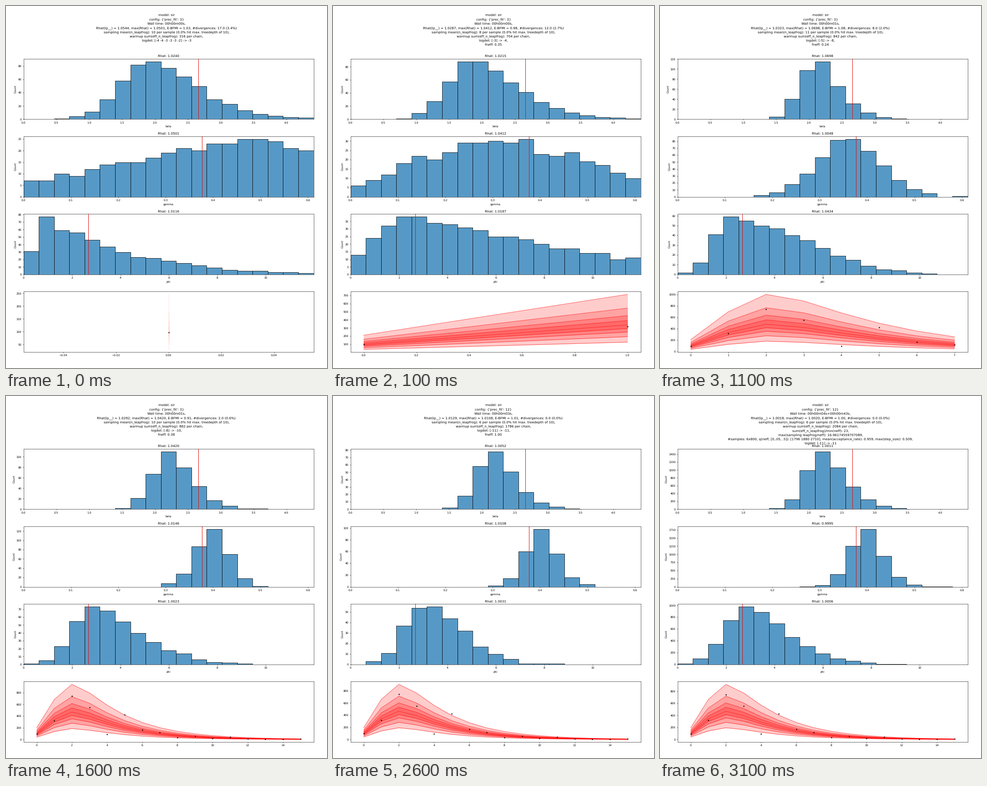
These frames come from a looping animation (706 px wide and 794 px high, 3.6 s). A matplotlib script:

```python
import numpy as np
import matplotlib.pyplot as plt
from matplotlib.animation import FuncAnimation

W, H, DPI = 706, 794, 64
S = 0.681            # default point sizes shrink by this factor
PX = 72 / DPI        # points per pixel
LEFT, WIDTH, HEIGHT = 38.5, 638, 132.7
TOP, PITCH = 115.5, 170.3
BINS = 19
POPULATION, SEED_CASES = 840, 100

plt.rcParams.update({
    'font.family': 'DejaVu Sans', 'font.size': 10 * S,
    'text.hinting': 'no_hinting',
    'axes.titlesize': 12 * S, 'axes.titlepad': 6 * S, 'axes.labelpad': 4 * S,
    'axes.linewidth': 0.6 * PX,
    'xtick.major.size': 3.5 * S, 'ytick.major.size': 3.5 * S,
    'xtick.major.pad': 3.5 * S + 0.5 * PX, 'ytick.major.pad': 3.5 * S,
    'xtick.major.width': 0.6 * PX, 'ytick.major.width': 0.6 * PX,
    'lines.markersize': 6 * S, 'lines.markeredgewidth': S,
})

# name, x limit, true value
PARAMS = [('beta', 4.412, 2.659), ('gamma', 0.612, 0.3765),
          ('phi', 11.97, 2.68)]
OBSERVED = [97, 319, 745, 551, 91, 427, 169, 117, 34, 56, 18, 39, 11, 3, 5, 9]
# log offsets of the quantile curves, in units of the upper spread
LEVELS = np.array([1, 0.64, 0.39, 0.2, 0, -0.18, -0.4, -0.74, -1.31])

fig = plt.figure(figsize=(W / DPI, H / DPI), dpi=DPI, facecolor='white')
states = []


def panel(row):
    bottom = H - TOP - PITCH * row - HEIGHT
    return fig.add_axes([LEFT / W, bottom / H, WIDTH / W, HEIGHT / H])


def header(lines):
    return [fig.text(0.5, 1 - (22.3 + 9.28 * i) / H, line, ha='center',
                     va='baseline', fontsize=12 * S)
            for i, line in enumerate(lines)]


def bump(rng, peak, mode, left, right, tail=1.6):
    """Counts of a skewed bell over the bins, with a little sampling noise."""
    d = np.arange(BINS) - mode
    shape = np.where(d < 0, (np.abs(d) / left) ** 2,
                     (np.abs(d) / right) ** tail)
    counts = peak * np.exp(-shape / 2)
    counts += 0.35 * np.sqrt(counts) * rng.normal(size=BINS)
    return np.round(counts.clip(0) * peak / counts.max())


def histogram(row, rhat, counts):
    name, limit, truth = PARAMS[row]
    ax = panel(row)
    step = limit / BINS
    used = np.flatnonzero(counts)
    ax.bar(used * step, counts[used], width=step, align='edge',
           facecolor='#1f77b4bf', edgecolor='black', linewidth=0.8 * PX)
    ax.axvline(truth, color='#e00c0c', linewidth=PX)
    ax.set(xlim=(0, limit), ylim=(0, 1.05 * counts.max()), title=f'Rhat: {rhat}')
    ax.set_xlabel(name, labelpad=4 * S + 0.5 * PX)
    ax.set_ylabel('Count')
    return ax


def infected(beta, gamma, days, sub=100):
    """Daily infected counts of the SIR model (Euler steps)."""
    i = SEED_CASES / POPULATION
    s, curve = 1 - i, []
    for step in range(days * sub):
        if step % sub == 0:
            curve.append(i * POPULATION)
        new = beta * s * i / sub
        s, i = s - new, i + new - gamma * i / sub
    return np.array(curve)


def fan(beta, gamma, spread, days):
    ax = panel(3)
    t = np.arange(days)
    curves = infected(beta, gamma, days) * np.exp(spread * LEVELS)[:, None]
    for i in range(4):
        ax.fill_between(t, curves[-1 - i], curves[i], color='red', alpha=0.2,
                        linewidth=S)
    for curve in curves:
        ax.plot(t, curve, color='red', alpha=0.6, linewidth=0.95 * PX)
    ax.plot(t, OBSERVED[:days], 'k.')
    return ax


def add_state(prec, wall, diag, leaps, warmup, tail, rhats, bumps, sir):
    rng = np.random.default_rng(len(states))
    lp, worst, bfmi, div = diag
    lines = ['model: sir', f"config: {{'prec_fit': {prec}}}",
             f'Wall time: {wall},',
             f'Rhat(lp__) = {lp}, max(Rhat) = {worst}, E-BFMI = {bfmi}, '
             f'#divergences: {div}',
             f'sampling mean(n_leapfrog): {leaps} per sample '
             '(0.0% hit max. treedepth of 10),',
             f'warmup sum(eff_n_leapfrog): {warmup} per chain,']
    group = header(lines + tail)
    for row in range(3):
        group.append(histogram(row, rhats[row], bump(rng, *bumps[row])))
    group.append(fan(*sir))
    states.append(group)


# bumps: peak count, mode and side widths in bins, tail exponent
# sir: beta, gamma, spread, days
add_state(3, '00h00m00s', ('1.0544', '1.0501', '1.03', '17.0 (3.4%)'), 10, 316,
          ['logdet: [-4 -4 -3 -3 -3 -2] -> -3'],
          ['1.0240', '1.0501', '1.0116'],
          [(87, 8, 2, 2.7), (25, 15, 9, 6), (77, 1, 0.75, 2.9, 1.1)],
          (2.2, 0.35, 0.9, 1))

add_state(3, '00h00m00s', ('1.0287', '1.0412', '0.98', '12.0 (2.7%)'), 8, 704,
          ['logdet: [-3] -> -4,', 'fneff: 0.35'],
          ['1.0215', '1.0412', '1.0187'],
          [(88, 7.5, 1.6, 2.6), (31, 8, 4.5, 7, 1.8), (38, 3, 2, 7, 1.3)],
          (2.1, 0.3, 0.75, 2))

add_state(3, '00h00m00s', ('1.0204', '1.0306', '0.94', '9.0 (2.1%)'), 7, 820,
          ['logdet: [-4] -> -5,', 'fneff: 0.30'],
          ['1.0162', '1.0306', '1.0290'],
          [(121, 8.3, 1.3, 1.33), (39, 7.5, 4, 4.5, 2), (30, 5.5, 3, 8.5)],
          (2.05, 0.25, 0.62, 4))

add_state(3, '00h00m01s', ('1.0323', '1.0698', '1.08', '8.0 (2.0%)'), 11, 842,
          ['logdet: [-5] -> -8,', 'fneff: 0.24'],
          ['1.0698', '1.0048', '1.0434'],
          [(115, 8.5, 1.05, 1.4), (83, 10.9, 2.1, 1.7), (59, 3, 1.2, 4.7, 2)],
          (2.15, 0.34, 0.74, 8))

add_state(3, '00h00m01s', ('1.0292', '1.0420', '0.91', '2.0 (0.6%)'), 10, 882,
          ['logdet: [-8] -> -10,', 'fneff: 0.38'],
          ['1.0420', '1.0146', '1.0023'],
          [(110, 9, 1.1, 1.3), (124, 12, 1.22, 1, 2), (73, 4.2, 1.4, 2.5)],
          (2.25, 0.375, 0.7, 16))

add_state(6, '00h00m02s', ('1.0776', '1.0146', '1.03', '3.0 (1.2%)'), 7, 1492,
          ['logdet: [-10] -> -11,', 'fneff: 1.00'],
          ['0.9933', '1.0120', '1.0146'],
          [(81, 8.8, 1.05, 1.25), (104, 12, 0.98, 0.85, 1.5),
           (70, 5, 1.43, 1.4)],
          (2.2, 0.39, 0.67, 16))

add_state(12, '00h00m03s', ('1.0129', '1.0108', '1.01', '0.0 (0.0%)'), 6, 1786,
          ['logdet: [-11] -> -11,', 'fneff: 1.00'],
          ['1.0052', '1.0108', '1.0031'],
          [(78, 8.8, 1, 1.3), (98, 12, 1, 0.9), (55, 4.5, 1.4, 2)],
          (2.25, 0.38, 0.67, 16))

add_state(12, '00h00m04s+00h00m43s', ('1.0018', '1.0020', '1.00', '0.0 (0.0%)'),
          6, 2084,
          ['sum(eff_n_leapfrog)/min(neff): 23,',
           'max(sampling leapfrog/neff): 16.96174559707089,',
           '#samples: 6x800, q(neff, [0,.05, .5]): [1796 1880 2710], '
           'mean(acceptance_rate): 0.959, max(step_size): 0.509,',
           'logdet: [-11] -> -11'],
          ['1.0011', '0.9995', '1.0006'],
          [(1470, 8.9, 1, 1.4), (1775, 11.9, 1.08, 0.95),
           (975, 4.1, 1.45, 2.28)],
          (2.25, 0.375, 0.67, 16))


def update(frame):
    # the first state lasts one tick, every other one five
    current = (frame + 4) // 5
    for k, group in enumerate(states):
        for artist in group:
            artist.set_visible(k == current)
    return []


anim = FuncAnimation(fig, update, frames=36, interval=100, repeat=True,
                     repeat_delay=0, blit=False)
plt.show()
```
